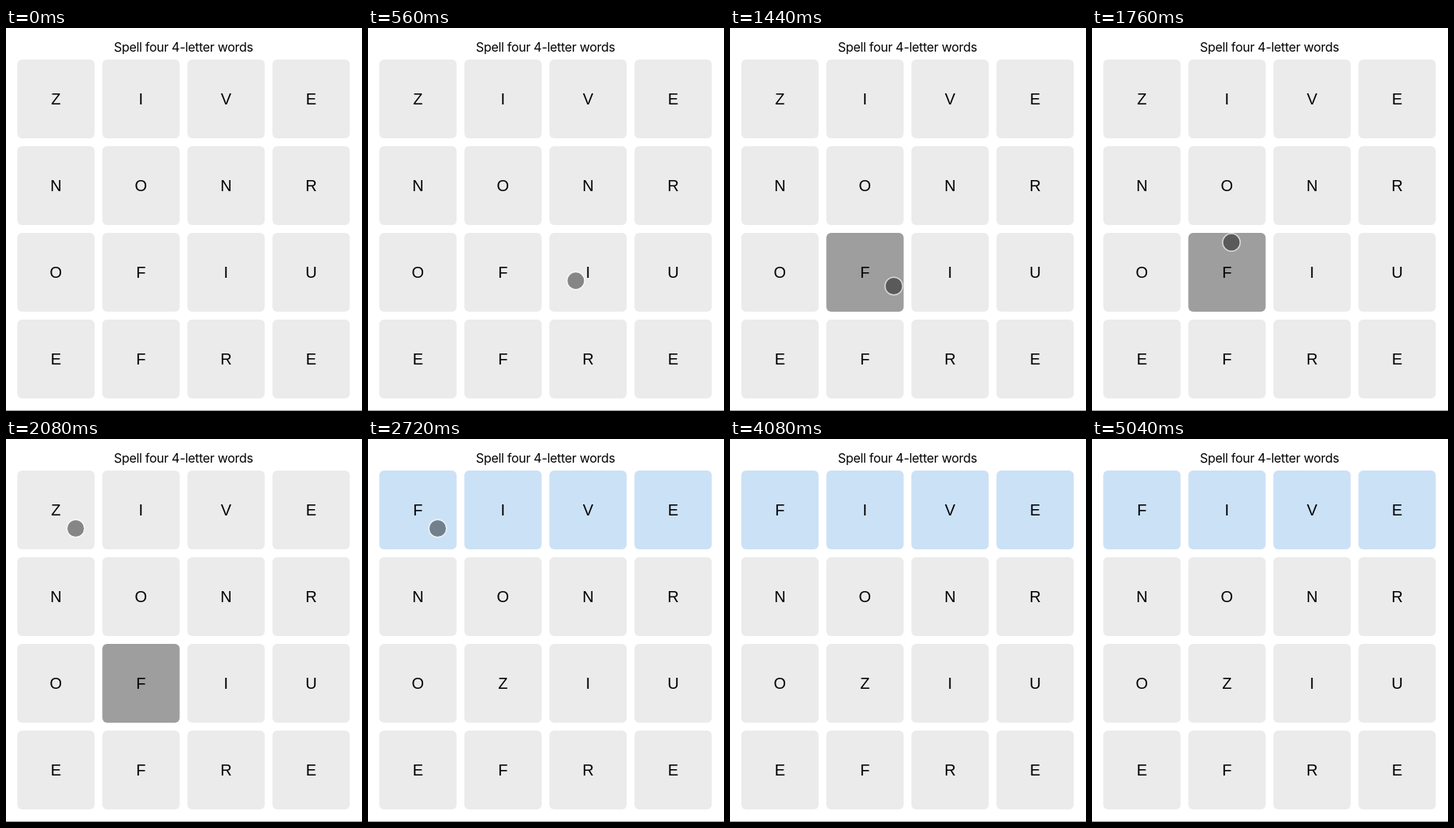
These frames come from a looping animation (452 by 486 pixels, 5.28 s). An HTML page with a canvas:

```html
<!DOCTYPE html>
<html lang="en">
<head>
<meta charset="utf-8">
<title>Word grid</title>
<style>
html, body { margin: 0; width: 100%; height: 100%; overflow: hidden; background: #fff; }
canvas { display: block; }
</style>
</head>
<body>
<canvas id="stage" width="452" height="486"></canvas>
<script>
const ctx = document.getElementById('stage').getContext('2d');
const LOOP = 5280, STEP = 80;
const SELECT = 1440, SWAP = 2720;
const lerp = (a, b, k) => a + (b - a) * k;

// Pointer centre at time t, or null while it is off stage.
function pointer(t) {
  if (t < 320 || t >= 4080) return null;
  if (t < 960) {
    const k = 1 - (1 - (t - 320) / 640) ** 2.3;
    return [lerp(372.5, 208, k), lerp(307.5, 327.5, k)];
  }
  if (t < 3680) {
    const u = Math.min(1, Math.max(0, (t - 1600) / 480));
    const k = u * u * (3 - 2 * u);
    return [lerp(208, 88.5, k), lerp(327.5, 113.5, k)];
  }
  const u = (t - 3680) / 320;
  return [lerp(88.5, 424.5, u ** 2.5), lerp(113.5, 24.5, u ** 3)];
}

function text(str, x, y, font, spacing) {
  ctx.font = font;
  ctx.letterSpacing = spacing;
  ctx.fillText(str, x, y);
}

function tile(col, row, letter, color) {
  const x = 14.3 + 108 * col, y = 40 + 110 * row;
  ctx.fillStyle = color;
  ctx.beginPath();
  ctx.roundRect(x, y, 98.2, 100, 6);
  ctx.fill();
  ctx.fillStyle = '#000';
  text(letter, x + 49.1, y + 57, '20px "Liberation Sans", Arial, sans-serif', '0px');
}

function draw(t) {
  const solved = t >= SWAP;
  const letters = solved ? 'FIVENONROZIUEFRE' : 'ZIVENONROFIUEFRE';
  ctx.fillStyle = '#fff';
  ctx.fillRect(0, 0, 452, 486);
  ctx.textAlign = 'center';
  ctx.fillStyle = '#000';
  text('Spell four 4-letter words', 225.3, 29.5, '16px Inter, sans-serif', '-0.3px');

  [...letters].forEach((letter, i) => {
    const picked = i === 9 && t >= SELECT && !solved;
    const color = picked ? '#9e9e9e' : solved && i < 4 ? '#cbe1f6' : '#ebebeb';
    tile(i % 4, Math.floor(i / 4), letter, color);
  });

  ctx.fillStyle = '#999';
  ctx.fillRect(0, 485, 452, 1);

  const p = pointer(t);
  if (!p) return;
  ctx.beginPath();
  ctx.arc(p[0], p[1], 10.6, 0, 2 * Math.PI);
  ctx.fillStyle = 'rgba(0,0,0,.43)';
  ctx.fill();
  ctx.beginPath();
  ctx.arc(p[0], p[1], 11.2, 0, 2 * Math.PI);
  ctx.strokeStyle = 'rgba(255,255,255,.6)';
  ctx.lineWidth = 1.5;
  ctx.stroke();
}

const start = performance.now();
function frame() {
  const t = (performance.now() - start) % LOOP;
  draw(Math.floor(t / STEP) * STEP);
  requestAnimationFrame(frame);
}
frame();
</script>
</body>
</html>
```
